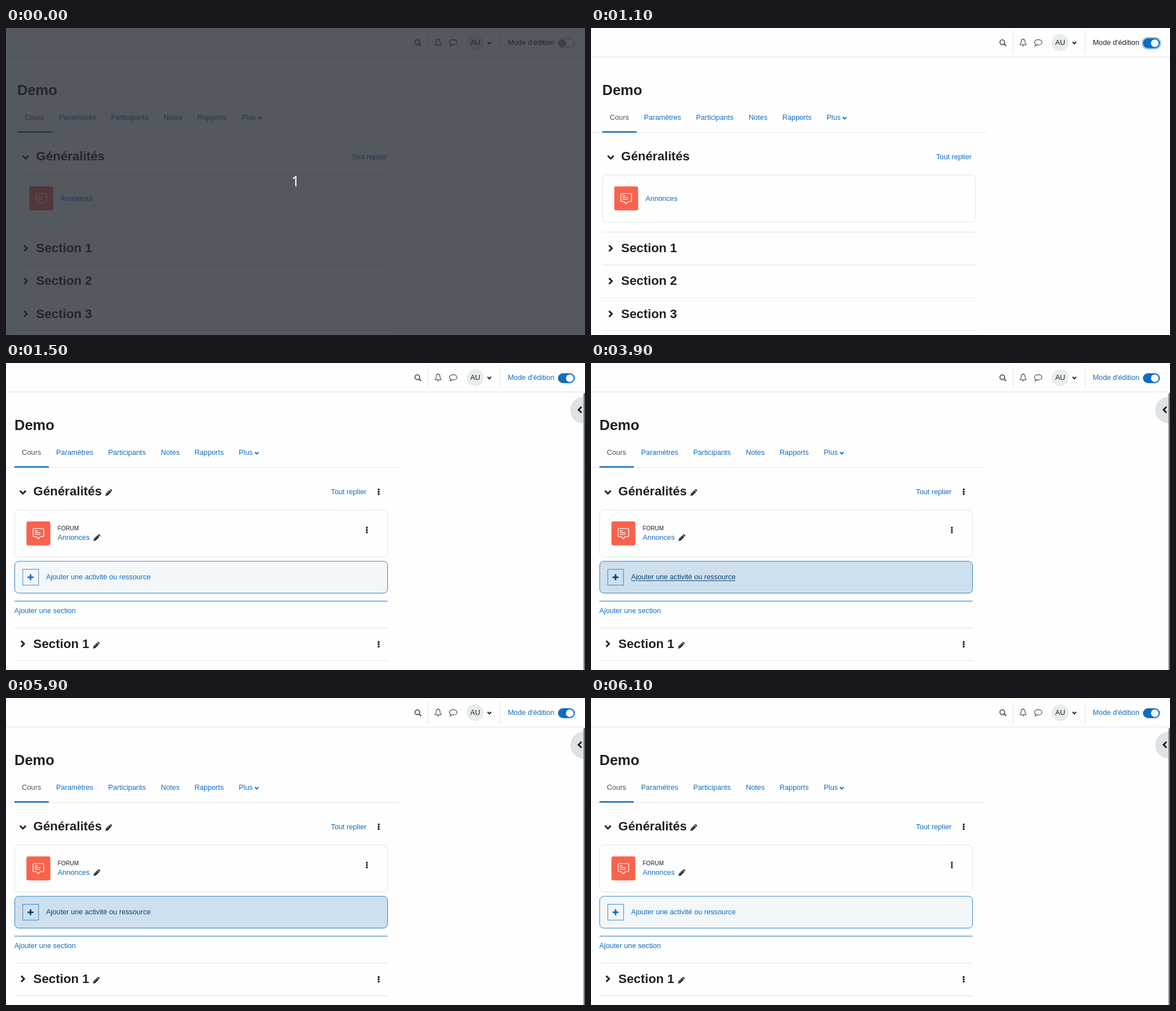
Write an HTML page that moves like this. It is 1028 px wide and 545 px high and loops after 7100 ms.

```html
<!DOCTYPE html>
<html lang="fr">
<head>
<meta charset="utf-8">
<title>Mode d'édition</title>
<style>
  html, body { margin: 0; width: 100%; height: 100%; overflow: hidden; background: #fefefe; }
  svg { display: block; width: 100vw; height: 100vh; }
  text { font: 12.75px "Liberation Sans", Arial, sans-serif; white-space: pre; }
  .ink { fill: #1d2125; }
  .link { fill: #0f6cbf; }
  .title { font-size: 25.5px; font-weight: bold; }
  .heading { font-size: 22.3px; font-weight: bold; }
  .small { font-size: 10.2px; }
  .rule { stroke: #dee2e6; fill: none; }
  .blue { stroke: #0f6cbf; fill: none; }
  .chevron { fill: none; stroke: #1d2125; stroke-width: 3; }
  .icon { fill: none; stroke: #5d646b; stroke-width: 1.4; }

  .countdown, .before, .after, .shift, .knob, .track, .ring, .label, .add, .underline {
    animation: 7100ms step-end infinite;
  }
  .countdown { animation-name: countdown; }
  .before { animation-name: before; }
  .after { animation-name: after; }
  .shift { animation-name: shift; }
  .track { animation-name: track; }
  .knob { animation-name: knob; }
  .ring { animation-name: ring; }
  .label { animation-name: label; }
  .add { animation-name: add; }
  .underline { animation-name: underline; }

  @keyframes countdown { 0% { opacity: 1 } 1.408%, 100% { opacity: 0 } }
  @keyframes before { 0% { opacity: 1 } 18.309%, 100% { opacity: 0 } }
  @keyframes after { 0% { opacity: 0 } 18.309%, 100% { opacity: 1 } }
  @keyframes shift { 0% { transform: none } 18.309%, 100% { transform: translateX(-5px) } }
  @keyframes track {
    0% { fill: #fefefe; stroke: #8f959e }
    14.084% { fill: #87b5df; stroke: #4f81af }
    15.492%, 100% { fill: #0f6cbf; stroke: #0f6cbf }
  }
  @keyframes knob {
    0% { fill: #8f959e; transform: none }
    14.084% { fill: #c7cace; transform: translateX(6.5px) }
    15.492%, 100% { fill: #fefefe; transform: translateX(13px) }
  }
  @keyframes ring { 0% { opacity: 0 } 14.084% { opacity: .4 } 18.309%, 100% { opacity: 0 } }
  @keyframes label { 0% { fill: #1d2125 } 18.309%, 100% { fill: #0f6cbf } }
  @keyframes add {
    0% { fill: #f3f7f9; color: #0f6cbf }
    53.521% { fill: #ebf3f8; color: #0e61ab }
    54.929% { fill: #cee0ee; color: #0a4375 }
    84.507% { fill: #edf3f7; color: #0e64b1 }
    85.915%, 100% { fill: #f3f7f9; color: #0f6cbf }
  }
  @keyframes underline { 0% { opacity: 0 } 53.521% { opacity: 1 } 83.098%, 100% { opacity: 0 } }
</style>
</head>
<body>
<svg viewBox="0 0 1028 545">
  <defs>
    <path id="down" class="chevron" d="M-5.2-2.6L0 2.6 5.2-2.6"/>
    <path id="right" class="chevron" d="M-2.6-5.2L2.6 0-2.6 5.2"/>
    <path id="caret" d="M-3.2-1.6L0 1.6 3.2-1.6" fill="none" stroke-width="2"/>
    <g id="pencil" class="ink">
      <path d="M0 12L.8 8 7 1.8 10.2 5 4 11.2z"/>
      <path d="M7.7 1.1L8.7.2Q9.4-.3 10 .2L11.8 2Q12.3 2.7 11.8 3.3L10.9 4.3z"/>
      <path d="M1 9.4L2.6 11M2.8 8.2L6.8 4.2" stroke="#fefefe" stroke-width=".7"/>
    </g>
    <path id="kebab" d="M0-4.3v.01M0 0v.01M0 4.3v.01" stroke="#1d2125" stroke-width="3.3" stroke-linecap="square"
      transform="scale(.95)"/>
  </defs>

  <rect width="1028" height="545" fill="#fefefe"/>

  <!-- top bar -->
  <path class="rule" d="M0 51.3H1028M749.5 7V45M877.5 7V45"/>
  <g class="icon">
    <circle cx="730.3" cy="25.2" r="4.2" stroke-width="2"/>
    <path d="M733.4 28.3L737 31.9" stroke-width="2.4"/>
    <path d="M761.6 29.6Q764 27.4 764 23.4Q764 20 767.2 20T770.4 23.4Q770.4 27.4 772.8 29.6z" stroke-linejoin="round"/>
    <path d="M767.2 18.4V20M765.6 31Q767.2 32.8 768.8 31"/>
    <path d="M794 20.8C797.8 20.8 800.6 22.8 800.6 25.4S797.8 30 794 30Q793 30 792 29.8Q790.3 31.4 788.4 31.7Q789.6 30.4 789.7 28.9Q787.4 27.6 787.4 25.4C787.4 22.8 790.2 20.8 794 20.8z"/>
  </g>
  <circle cx="833" cy="26" r="15" fill="#e9ecec"/>
  <text class="ink" x="833" y="30" text-anchor="middle">AU</text>
  <use href="#caret" x="858.2" y="26.4" stroke="#1d2125"/>
  <text class="label" x="891" y="30">Mode d'édition</text>
  <rect class="ring" x="979" y="17.2" width="32" height="19.6" rx="9.8" fill="none" stroke="#0f6cbf" stroke-width="2.6"/>
  <rect class="track" x="980.5" y="18.7" width="29" height="16.5" rx="8.25"/>
  <circle class="knob" cx="988" cy="27" r="6.8"/>

  <!-- parts common to both views -->
  <g class="shift">
    <text class="ink title" x="20" y="119">Demo</text>
    <path class="rule" d="M1 185.5H702"/>
    <path class="blue" d="M20 184.5H81" stroke-width="2.6"/>
    <text x="33.3" y="163" fill="#495057">Cours</text>
    <g class="link">
      <text x="94.1" y="163">Paramètres</text>
      <text x="186.4" y="163">Participants</text>
      <text x="280" y="163">Notes</text>
      <text x="339.8" y="163">Rapports</text>
      <text x="418.3" y="163">Plus</text>
    </g>
    <use href="#caret" x="450.2" y="159.8" stroke="#0f6cbf"/>
    <use href="#down" x="35" y="229.4"/>
    <text class="ink heading" x="53.6" y="235">Généralités</text>
    <rect class="rule" x="20.5" y="261" width="662" height="83.5" rx="7"/>
    <rect x="41.3" y="281.3" width="42.4" height="42.4" rx="3" fill="#f7634d"/>
    <g fill="none" stroke="#fefefe" stroke-width="1.3" stroke-linejoin="round">
      <path d="M55 293.8H70Q72 293.8 72 295.8V306.2Q72 308.2 70 308.2H66L62.4 312 58.8 308.2H55Q53 308.2 53 306.2V295.8Q53 293.8 55 293.8z"/>
      <path d="M56 298H61M56 301.2H66M56 304.4H66"/>
    </g>
  </g>

  <!-- reading view -->
  <g class="before">
    <text class="link" x="612.7" y="233">Tout replier</text>
    <text class="link" x="96.8" y="306.6">Annonces</text>
    <path class="rule" d="M20 362.3H682.5M20 420.5H682.5M20 478.6H682.5M20 537H682.5"/>
    <use href="#right" x="34.6" y="391"/>
    <use href="#right" x="34.6" y="449.3"/>
    <use href="#right" x="34.6" y="507.6"/>
    <g class="ink">
      <text class="heading" x="53.6" y="398">Section 1</text>
      <text class="heading" x="53.6" y="456.4">Section 2</text>
      <text class="heading" x="53.6" y="514.7">Section 3</text>
    </g>
  </g>

  <!-- editing view -->
  <g class="after">
    <use href="#pencil" x="176.4" y="224"/>
    <text class="link" x="577" y="233">Tout replier</text>
    <use href="#kebab" x="661.7" y="228.6"/>
    <text class="ink small" x="91.8" y="296.6">FORUM</text>
    <text class="link" x="91.8" y="314.4">Annonces</text>
    <use href="#pencil" x="155.3" y="304"/>
    <use href="#kebab" x="640.7" y="296.6"/>

    <g class="add">
      <rect x="15.5" y="352" width="662" height="56.5" rx="7" stroke="#0f6cbf" stroke-opacity=".85"/>
      <rect class="blue" x="29.8" y="366.3" width="28" height="28" stroke-opacity=".8"/>
      <path d="M38.3 380.3H48.9M43.6 375V385.6" stroke="currentColor" stroke-width="2.8"/>
      <text x="71.2" y="384.4" fill="currentColor">Ajouter une activité ou ressource</text>
      <path class="underline" d="M71.2 386.5H78.2M83.2 386.5H256" stroke="currentColor"/>
    </g>

    <path class="blue" d="M15 422.8H677.5"/>
    <text class="link" x="14.8" y="443.5">Ajouter une section</text>
    <path class="rule" d="M15 470.5H677.5M15 528.5H677.5"/>
    <use href="#right" x="29.6" y="498.5"/>
    <text class="ink heading" x="48.6" y="506">Section 1</text>
    <use href="#pencil" x="154.4" y="495"/>
    <use href="#kebab" x="661.7" y="499.4"/>

    <path d="M1028 60H1025.5A23.7 23.7 0 0 0 1025.5 107.4H1028z" fill="#dee2e4"/>
    <path class="chevron" d="M1021.8 77.8L1016.6 83 1021.8 88.2"/>
    <path d="M1025.4 545V55.5Q1025.4 53 1028 53V545z" fill="#6a737b"/>
  </g>

  <g class="countdown">
    <rect width="1028" height="545" fill="#252a32" fill-opacity=".78"/>
    <text x="514" y="281" text-anchor="middle" fill="#fff" style="font: 25px 'Noto Sans', 'Open Sans', sans-serif">1</text>
  </g>
</svg>
</body>
</html>
```
